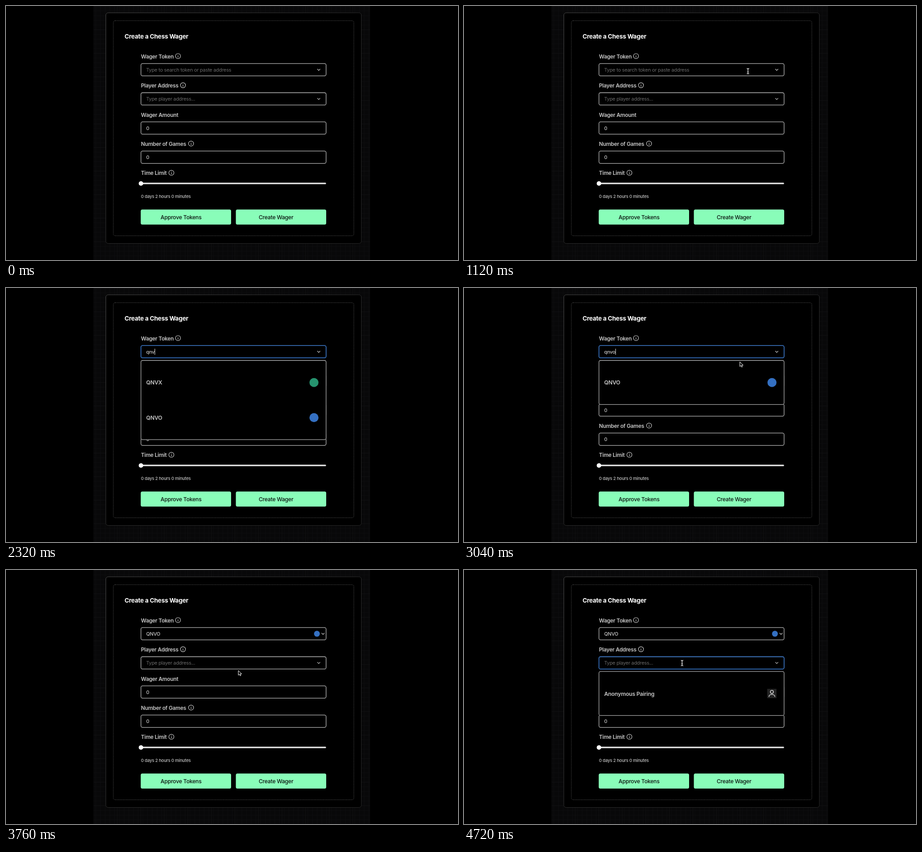
An HTML page that plays this animation: 998 by 561 pixels, repeating every 4800 ms.

```html
<!DOCTYPE html>
<html lang="en">
<head>
<meta charset="utf-8">
<title>Create a Chess Wager</title>
<style>
  html, body { margin: 0; width: 100%; height: 100%; overflow: hidden; background: #000; }
  svg { display: block; width: 100vw; height: 100vh; }
  text { font-family: Inter, "Open Sans", sans-serif; letter-spacing: -.02em; white-space: pre; }
  .title { font-size: 13.5px; font-weight: 700; fill: #fff; }
  .label { font-size: 11.8px; font-weight: 600; fill: #c8c8c8; }
  .value { font-size: 10.8px; font-weight: 500; fill: #c8c8c8; }
  .hint { font-size: 10.8px; fill: #6b6b6b; }
  .small { font-size: 9.5px; font-weight: 500; fill: #c6c6c6; }
  .item { font-size: 12.2px; font-weight: 600; fill: #c8c8c8; }
  .button { font-size: 12.1px; font-weight: 500; fill: #0b1510; text-anchor: middle; }
  .field { fill: #000; stroke: #b9b9b9; stroke-width: 1.3; }
  .list { fill: #000; stroke: #aeaeae; stroke-width: 1.3; }
  .backing { fill: #000; stroke: #000; stroke-width: 2; }
  .ring { fill: none; stroke: #2a60a8; stroke-width: 1.9; }
  .icon { fill: none; stroke: #c8c8c8; stroke-width: 1.2; stroke-linecap: round; stroke-linejoin: round; }
  .caret { fill: #ddd; }
</style>
</head>
<body>
<svg id="stage" viewBox="0 0 998 561">
  <defs>
    <pattern id="minor" width="10.4" height="10.4" patternUnits="userSpaceOnUse">
      <path d="M.5 0V10.4M0 .5H10.4" stroke="#0d0d0f" stroke-width=".8"/>
    </pattern>
    <pattern id="major" x="193" width="52" height="52" patternUnits="userSpaceOnUse">
      <path d="M.5 0V52M0 .5H52" stroke="#111113" stroke-width=".8"/>
    </pattern>
    <linearGradient id="edge" x2="1" y2="1">
      <stop stop-color="#4a4a4a"/><stop offset=".5" stop-color="#2c2c2c"/><stop offset="1" stop-color="#262626"/>
    </linearGradient>
  </defs>
  <rect width="998" height="561"/>
  <rect x="193.5" width="610.5" height="561" fill="#080809"/>
  <rect x="193.5" width="610.5" height="561" fill="url(#minor)"/>
  <rect x="193.5" width="610.5" height="561" fill="url(#major)"/>
  <rect x="220.5" y="15" width="564" height="509.5" rx="5" fill="#000" stroke="url(#edge)"/>
  <rect x="237" y="32.5" width="531" height="475" rx="4" fill="none" stroke="#484848" stroke-dasharray="2 1.4"/>
  <text class="title" x="261.7" y="71.8">Create a Chess Wager</text>
  <g id="form"></g>
  <g id="live"></g>
  <g id="cursor">
    <path id="beam" d="M-2.6-6Q-.4-6 0-4.6Q.4-6 2.6-6M-2.6 6Q-.4 6 0 4.6Q.4 6 2.6 6M0-4.6V4.6M-1.4 1.6H1.4" fill="none" stroke="#e8e8e8" stroke-width="1.4"/>
    <path id="arrow" d="M0 0V10.4L2.5 8.2L4.1 11.8L5.8 11L4.2 7.5H7.3Z" fill="#080808" stroke="#fff"/>
    <path id="hand" d="M-1.2.8Q0-.6 1 .8V4L4.6 4.6Q6.2 5 6 6.6L5 10.6H.2L-3 6.6Q-3.2 5-1.2 6Z" fill="#fff" stroke="#333" stroke-width=".5"/>
  </g>
</svg>
<script>
const LOOP = 4800, STEP = 80;
const LEFT = 298, WIDTH = 408.7, TEXT_X = 309.5;
const TOKEN_Y = 127.1, PLAYER_Y = 191.5, ROW = 77.5;
const $ = id => document.getElementById(id);

const text = (cls, x, y, s) => `<text class="${cls}" x="${x}" y="${y}">${s}</text>`;
const box = (cls, y, h) => `<rect class="${cls}" x="${LEFT}" y="${y}" width="${WIDTH}" height="${h}" rx="3.5"/>`;
const field = y => box('field', y, 27.2);
const list = (y, h) => box('backing', y, h) + box('list', y, h);
const dot = (x, y, r, color) => `<circle cx="${x}" cy="${y}" r="${r}" fill="${color}"/>`;
const chevron = (x, y) => `<path class="icon" d="M${x - 2.8} ${y - 1.3}l2.8 2.8 2.8-2.8"/>`;
const info = (x, y) => `<g class="icon"><circle cx="${x}" cy="${y}" r="5.6"/><path d="M${x} ${y - .4}v2.9M${x} ${y - 2.6}v.1"/></g>`;
const button = (x, center, s) =>
  `<rect x="${x}" y="449.6" width="199.5" height="33.2" rx="3.5" fill="#89fdb9"/>` + text('button', center, 471, s);

$('form').innerHTML = [
  ['Wager Token', 379.8, TOKEN_Y],
  ['Player Address', 390.8, PLAYER_Y],
  ['Wager Amount', 0, 255.9, '0'],
  ['Number of Games', 408.6, 320.4, '0']
].map(([name, iconX, y, value]) =>
  text('label', LEFT, y - 11.4, name) + (iconX ? info(iconX, y - 16.5) : '') + field(y) +
  (value ? text('value', TEXT_X, y + 17.8, value) : '')
).join('') +
  text('label', LEFT, 373.4, 'Time Limit') + info(365.2, 368.4) +
  `<rect x="${LEFT}" y="390.3" width="${WIDTH}" height="3.2" rx="1.5" fill="#e6e6e6"/>` +
  dot(298, 392, 5, '#fff') +
  text('small', LEFT, 424, '0 days 2 hours 0 minutes') +
  button(297.5, 386.5, 'Approve Tokens') + button(507.5, 596.2, 'Create Wager');

const tokens = [['MQLO', '#2b2727'], ['OMVH', '#f6f6f6'], ['QNVX', '#26946f'], ['QNVO', '#3470c2']];
const typed = [[0, ''], [2000, 'q'], [2160, 'qn'], [2320, 'qnv'], [2560, 'qnvo'], [3680, 'QNVO']];
const path = [[560, 752, 222], [720, 688, 172], [880, 645, 148], [1040, 627, 144], [2800, 627, 144],
  [3040, 609, 163], [3200, 555, 193], [3360, 518, 219], [3520, 513, 222], [3920, 513, 222],
  [4080, 491, 209], [4160, 481.5, 205.5]];

const within = (t, a, b) => t >= a && t < b;
const ramp = (t, a, d) => Math.min(1, Math.max(0, (t - a) / d));
const at = (keys, t) => keys.filter(k => k[0] <= t).pop();

function pointer(t) {
  const a = at(path, t) || path[0];
  const b = path[path.indexOf(a) + 1] || a;
  const p = b === a ? 0 : (t - a[0]) / (b[0] - a[0]);
  return [a[1] + (b[1] - a[1]) * p, a[2] + (b[2] - a[2]) * p];
}

function tokenList(query, hovered) {
  const rows = tokens.filter(([name]) => name.startsWith(query.toUpperCase()));
  return list(160, Math.min(271.5, 19.8 + ROW * rows.length)) +
    (hovered ? '<rect x="299" y="171" width="407" height="75.5" fill="#141820"/>' : '') +
    rows.slice(0, 3).map(([name, color], i) =>
      text('item', TEXT_X, 213.3 + i * ROW, name) + dot(680, 208.8 + i * ROW, 10, color)).join('');
}

function playerList() {
  return list(224.2, 97.2) + text('item', TEXT_X, 277.6, 'Anonymous Pairing') +
    '<rect x="669.5" y="262.5" width="20.5" height="20.5" fill="#242424"/>' +
    '<g class="icon" style="stroke:#eee;stroke-width:1.4"><circle cx="679.8" cy="269.3" r="3.4"/>' +
    '<path d="M673.4 279.5c0-6.2 12.8-6.2 12.8 0"/></g>';
}

function input(y, value, hint, focus, caret) {
  const ring = focus ? `<g opacity="${focus}">${box('ring', y, 27.2)}</g>` : '';
  return (value ? text('value entry', TEXT_X, y + 17.8, value) : text('hint', TEXT_X, y + 17.8, hint)) + ring +
    (caret ? `<rect class="caret" x="${TEXT_X - .5}" y="${y + 7}" width="1.1" height="13.4"/>` : '');
}

function draw(t) {
  const value = at(typed, t)[1];
  const chosen = t >= 3680;
  const tokenOpen = within(t, 1200, 3680), playerOpen = t >= 4240;
  const [x, y] = pointer(t);
  const hovered = tokenOpen && t > 2800 && y > 171;
  const tokenCaret = within(t, 1200, 1680) || within(t, 2000, 3120);

  $('live').innerHTML =
    input(TOKEN_Y, value, 'Type to search token or paste address',
      ramp(t, 1200, 200) * (1 - ramp(t, 3560, 200)), tokenCaret) +
    (chosen ? dot(686.5, 140.8, 6.5, '#3470c2') : '') + chevron(chosen ? 700 : 690.5, 140.8) +
    input(PLAYER_Y, '', 'Type player address...', ramp(t, 4240, 200), within(t, 4240, 4720)) +
    chevron(690.5, 205.2) +
    (tokenOpen ? tokenList(value, hovered) : '') + (playerOpen ? playerList() : '');

  const entry = document.querySelector('.entry');
  const caret = document.querySelector('.caret');
  if (entry && caret && !chosen) caret.setAttribute('x', TEXT_X + entry.getComputedTextLength());

  const overField = x > LEFT && x < LEFT + WIDTH &&
    (within(y, TOKEN_Y, 154.5) || (!tokenOpen && within(y, PLAYER_Y, 219)));
  const shape = hovered ? 'hand' : overField ? 'beam' : 'arrow';
  for (const id of ['beam', 'arrow', 'hand']) $(id).style.display = id === shape ? '' : 'none';
  // The pointer hides while keys are pressed.
  $('cursor').style.display = within(t, 560, 2000) || t >= 2880 ? '' : 'none';
  $('cursor').setAttribute('transform', `translate(${x} ${y})`);
}

let start, last = -1;
function tick(now) {
  start ??= now;
  const t = Math.floor((now - start) % LOOP / STEP) * STEP;
  if (t !== last) draw(last = t);
  requestAnimationFrame(tick);
}
draw(0);
requestAnimationFrame(tick);
</script>
</body>
</html>
```
